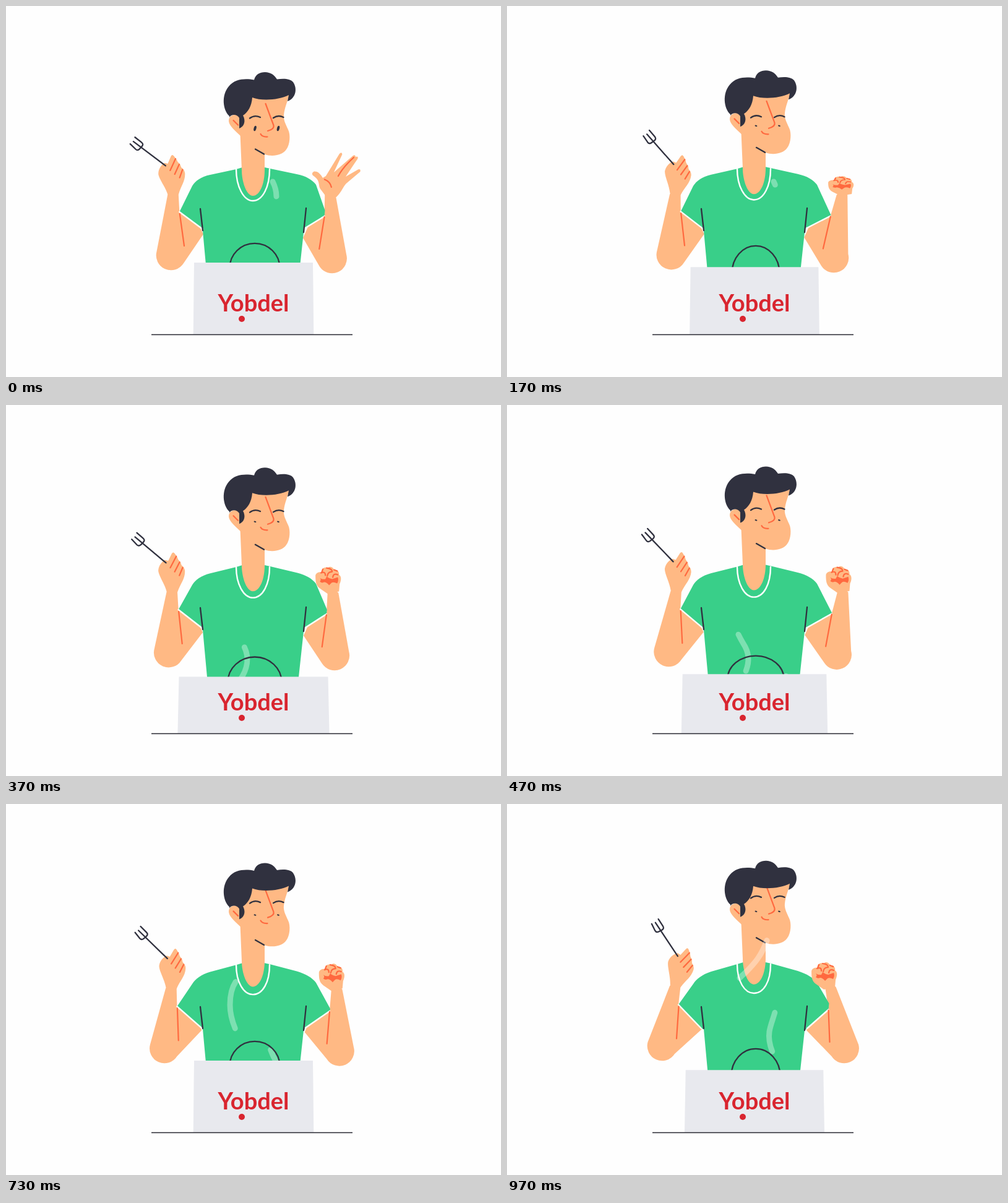
Write an HTML page that moves like this. It is 800 px wide and 600 px high and loops after 1 s.

```html
<!DOCTYPE html>
<html lang="en">
<head>
<meta charset="utf-8">
<title>Lunch bag</title>
<style>
html, body { margin: 0; width: 100%; height: 100%; overflow: hidden; background: #fefefe; }
svg { display: block; width: 100%; height: 100%; }
.skin { fill: #ffb984; }
.hair { fill: #30313f; }
.green { fill: #39cf89; }
.dark, .orange, .white, .steam { fill: none; stroke-linecap: round; stroke-linejoin: round; }
.dark { stroke: #30313f; stroke-width: 2.3; }
.orange { stroke: #ff693f; stroke-width: 2.2; }
.white { stroke: #fff; stroke-width: 2.4; }
.steam { stroke: #fff; stroke-width: 9; stroke-opacity: .34; }
.brand { font: 700 38px Lato, "Open Sans", sans-serif; fill: #d9252f; text-anchor: middle; }
</style>
</head>
<body>
<svg viewBox="0 0 800 600">
  <path id="armL" class="skin"/>
  <path id="armR" class="skin"/>
  <path id="shirt" class="green"/>
  <path id="hems" class="white"/>
  <path id="creases" class="orange"/>
  <path class="dark" d="M314 328L318 363M485 327L481 366"/>

  <g id="handL">
    <path class="skin" d="M261 306C257 293 246 280 245 272C245 263 250 257 255 254L260 255L265 243Q267 239 270 243L274 248L276 252L280 256L282 261Q287 264 288 270C289 283 282 290 278 305Q269 312 261 306Z"/>
    <path class="orange" d="M272.500 247L264 266M278.500 256L271.500 272M284 264.500L279.500 277.500"/>
    <path class="dark" d="M256.500 258.500L204 220M206.500 213L217 221Q221 224 218 227.500L214 232Q211 235 208 232.500L199 224"/>
  </g>

  <g id="open">
    <path class="skin" d="M517 309C514 301 506 297 506 289C505 281 502 278 496 274Q493 270 498 267.500C505 267 509 273 512 278L517 275L539 239Q543 235 543.500 240L530 269L561 242Q565 240 565 244Q570 242 568.500 247L549 276L569 264.500Q574 263 572.500 268L550 287C545 292 543 300 534 309Z"/>
    <path class="orange" d="M562 245C552 254 543 264 537 275M515 280.500Q524 284 526 293"/>
  </g>
  <g id="fist">
    <path class="skin" d="M0 22L-13 13C-20 8 -20 0 -20 -8C-19 -13 -13 -14 -10 -13C-11 -20 -4 -22 0 -20C3 -24 9 -21 10 -17C15 -18 19 -14 18 -9C23 -6 21 2 19 6L18 18Z"/>
    <path fill="#ff693f" d="M-13 -4Q-9 -1 -4 -2L-2 -6Q2 -3 7 -2L16 -5Q18 0 15 5Q9 2 6 4L2 8Q-2 3 -6 3Q-10 5 -13 2Q-10 -1 -13 -4Z"/>
    <path class="orange" d="M-10 -13L-8 -18M-11 -12Q-4 -15 -4 -8M-2 -20Q7 -19 7 -14M-1 -7Q0 -14 7 -14M10 -17L15 -15M8 -5Q9 -12 16 -9"/>
  </g>

  <path id="collar" class="white"/>
  <g id="head">
    <path class="skin" d="M378 195L381 265C381 285 389 307 399 307C410 307 418 288 418 265L418 235Z"/>
    <path class="skin" d="M378 178C366 172 357 180 361 190C364 197 372 203 379 210L402 231L418 240C430 244 446 242 453 232C459 224 460 208 456 200C452 191 448 184 449 176C450 165 455 155 458 142L396 140Z"/>
    <path class="dark" d="M403 231.500L417 239.500"/>
    <path class="orange" d="M367.500 185L375 192.500"/>
    <g id="face">
      <path class="orange" d="M419.500 158L432.500 193Q434 199 423 202M411.500 207Q414 212 422.500 211.500"/>
      <g class="hair">
        <ellipse id="eyeL" rx="2" ry="4.300"/>
        <ellipse id="eyeR" rx="2" ry="4.300"/>
      </g>
    </g>
    <path id="brows" class="dark" d="M394 181.500Q402 175.500 411 180M432 181Q440 175.500 448.500 180"/>
    <path class="hair" d="M361 178C350 168 348 144 360 130C370 117 388 117 401 119.500C403 111 410 107 418.500 107C428 107 434 112 438 118.500C448 117 459 117 464 123C471 133 469 149 455 154L457 144C441 152 414 154 398 148C397 162 391 172 383 177C388 186 385 195 377 198L377 181C373 174 364 175 361 180Z"/>
  </g>

  <path id="steamA" class="steam" d="M378 445C392 425 394 404 382 386C370 366 362 345 362 325C362 295 372 284 385 273C402 256 412 244 421 218"/>
  <path id="steamB" class="steam"/>
  <path id="steamC" class="steam"/>
  <ellipse id="handle" class="dark" cx="402"/>
  <path id="bag" fill="#e8e9ee"/>
  <text class="brand" x="400" y="494">Yobdel</text>
  <circle cx="381" cy="506" r="5" fill="#d9252f"/>
  <path d="M235 531.500H560" stroke="#26262f" stroke-width="1.400"/>
</svg>
<script>
const FRAMES = 30, LOOP = 1000;
const el = {};
document.querySelectorAll("[id]").forEach(n => el[n.id] = n);

const set = (id, attrs) => {
  for (const name in attrs) el[id].setAttribute(name, attrs[name]);
};
const path = (id, d) => set(id, { d });
const move = (id, transform) => set(id, { transform });
const wave = (k, peak, period) => Math.cos(2 * Math.PI * (k - peak) / period);
const clamp = x => Math.min(1, Math.max(0, x));
const smooth = x => (1 - Math.cos(Math.PI * clamp(x))) / 2;

// Piecewise linear value through [frame, value] pairs
function along(k, keys) {
  if (k <= keys[0][0]) return keys[0][1];
  for (let i = 1; i < keys.length; i++) {
    const [a, va] = keys[i - 1], [b, vb] = keys[i];
    if (k <= b) return va + (vb - va) * (k - a) / (b - a);
  }
  return keys[keys.length - 1][1];
}

// Shows only the stretch of a path between two lengths
function trim(id, from, to) {
  set(id, {
    "stroke-dasharray": `${Math.max(0.1, to - from)} 2000`,
    "stroke-dashoffset": -from,
    visibility: to > from ? "visible" : "hidden"
  });
}

// side: 1 for the left arm, -1 for the right one
function arm(id, side, wrist, elbow, pit, hem) {
  const [wx, wy] = wrist, [ex, ey] = elbow;
  path(id, `M${wx - 8.5 * side} ${wy}L${ex - 23.5 * side} ${ey - 5}
    A24 24 0 0 ${side > 0 ? 0 : 1} ${ex + 20 * side} ${ey + 14}
    L${pit}L${400 - 100 * side} 330L${hem}L${wx + 9 * side} ${wy}
    Q${wx} ${wy - 8} ${wx - 8.5 * side} ${wy}Z`);
}

function drawArms(k, u, e) {
  const swing = 3.6 * wave(k, 3, 12);
  const sway = wave(k, 4.2, 10);
  const wristL = [269.8 + swing, 305 - 11 * e];
  const wristR = [533 + 10 * sway, 306 - 10 * e];
  const hemL = [280.3 + 0.4 * swing - 4 * e, 333 - 8.5 * e];
  const hemR = [518.5 + 4.5 * sway + 5.5 * e, 340 - 7.5 * e];
  const pitL = [318 - 4 * e * e, 361 + 2 * e];
  const pitR = [482 + 3 * e, 360 + 3 * e];

  arm("armL", 1, wristL, [267 - 16 * e, 402 - 12 * e], [319 - 4 * e, 369 - 5 * e], hemL);
  arm("armR", -1, wristR, [526.6 + 18 * e, 407 - 13 * e], [480 + 4 * e, 375 - 9 * e], hemR);

  const tip = [hemR[0] + 1, hemR[1] - 5 * (1 - sway)];
  path("shirt", `M372 ${264 - 5 * u}L330 ${273 - 2 * u}C315 276 306 283 301 291
    L${hemL}L${pitL}L318 364L325 440H473L481 366L${pitR}L${hemR}L${tip}
    L501 289C495 281 485 275 470 ${272 - 2 * u}L427 ${263 - 5 * u}L418 ${261 - 5 * u}H382Z`);
  path("hems", `M${hemL}L${pitL}M${pitR}L${hemR}`);
  path("creases", `M${hemL[0] + 0.5} ${hemL[1] + 3}L${288 - 14 * e} ${388 - 8.5 * e}
    M${hemR[0]} ${hemR[1] + 1}L${508 + 2 * sway + 15.5 * e} ${393 - 8 * e}`);

  const turn = 5.3 + 0.33 * k + 5.3 * wave(k, 5, 12);
  move("handL", `translate(${wristL[0] - 269} ${wristL[1] - 305}) rotate(${turn} 269 305)`);

  const closed = k >= 3;
  el.open.style.display = closed ? "none" : "";
  el.fist.style.display = closed ? "" : "none";
  const shift = wristR[0] - 524.3;
  move("open", `translate(${shift} ${wristR[1] - 306}) rotate(${shift * 0.8} 525 306)`);
  const grow = clamp((k - 5) / 3);
  move("fist", `translate(${526 - 3 * u + 11 * sway + 4 * (1 - grow)} ${307 - 9 * u})
    scale(1 ${0.72 + 0.28 * grow}) translate(0 -20)`);
}

function drawHead(k, u) {
  const top = 264 - 5 * u, low = 315 - 9 * u;
  const lift = 15.3 * u;
  path("collar", `M372 ${top}C372 ${top + 28} 384 ${low} 399 ${low}C415 ${low} 426 ${top + 28} 426 ${top}`);
  move("head", `translate(0 ${-lift})`);
  move("face", `translate(0 ${-9 * u})`);
  move("brows", `translate(0 ${lift - 1.18 * Math.max(0, k - 4.3)})`);
  const lid = Math.max(0.25, 1 - 0.2 * k);
  move("eyeL", `translate(402.500 198) rotate(15) scale(1 ${lid})`);
  move("eyeR", `translate(440 198) rotate(15) scale(1 ${lid})`);
}

function drawBag(k) {
  const p = k % 22;
  const drop = 24.5 * (p < 11 ? smooth((p - 1.5) / 9.5) : 1 - smooth((p - 11) / 11));
  const top = 415 + drop, half = 96 + drop, base = 97.3 + 1.03 * drop;
  path("bag", `M${400 - half} ${top}H${400 + half}L${400 + base} 531H${400 - base}Z`);

  const rise = 31.6 + 2.9 * wave(k, 6, 22);
  const ry = rise * 1.28;
  set("handle", { rx: (41 - 3.7 * wave(k, 4, 22)) / 0.975, ry, cy: top - rise + ry });
}

function drawSteam(k) {
  trim("steamA",
    along(k, [[11, 0], [14, 17], [17, 40], [22, 89], [29, 175]]),
    along(k, [[5, 0], [8, 33], [14, 80], [17, 110], [22, 167], [29, 251]]));
  trim("steamB",
    along(k, [[20, 0], [29, 54]]),
    along(k, [[12, 0], [14, 10], [22, 57], [29, 119]]));
  trim("steamC", steamEnd - along(k, [[0, 25], [5, 6], [8, 1], [9, 0]]), steamEnd);
}

function draw(ms) {
  const k = Math.min(FRAMES - 1, Math.floor(ms * FRAMES / LOOP + 0.11));
  const u = k / (FRAMES - 1);
  drawArms(k, u, u ** 1.5);
  drawHead(k, u);
  drawBag(k);
  drawSteam(k);
}

const rightSteam = "M457 446C440 425 420 395 424 368C427 350 437 335 437 308C437 298 434 290 431 284";
path("steamB", rightSteam);
path("steamC", rightSteam);
const steamEnd = el.steamC.getTotalLength();

const start = performance.now();
function tick() {
  draw((performance.now() - start) % LOOP);
  requestAnimationFrame(tick);
}
tick();
</script>
</body>
</html>
```
